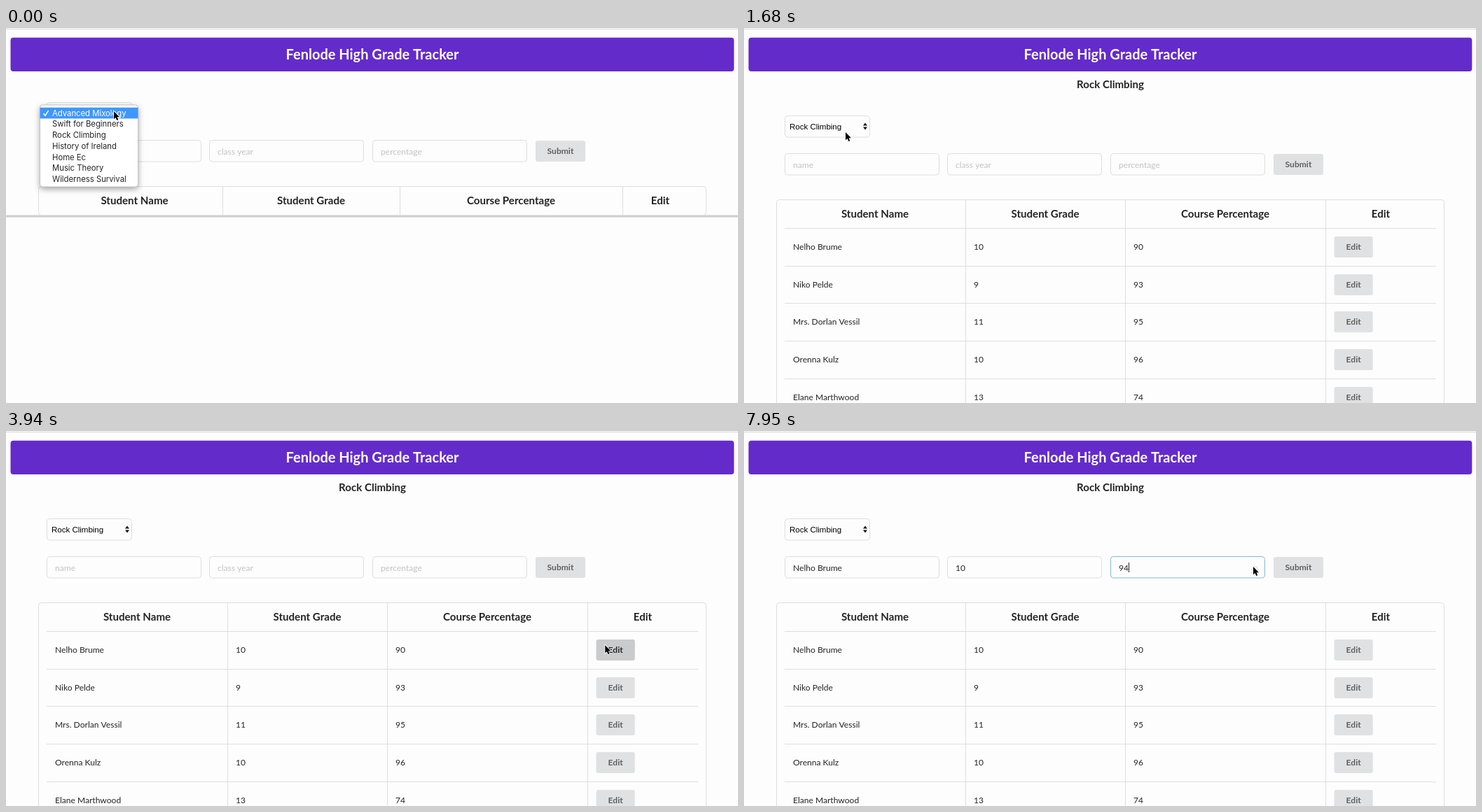
These frames come from a looping animation (1045x536 px, 8000 ms). An HTML page with a canvas:

```html
<!DOCTYPE html>
<html lang="en">
<head>
<meta charset="utf-8">
<title>Grade Tracker</title>
<style>
html, body { margin: 0; width: 100%; height: 100%; overflow: hidden; background: #fdfdfd; }
canvas { display: block; }
</style>
</head>
<body>
<canvas id="stage" width="1045" height="536"></canvas>
<script>
const ctx = document.getElementById('stage').getContext('2d');
const LOOP = 8000, STEP = 148;
const INK = '#242424', LINE = '#dedede', PAGE = '#fdfdfd';
const lato = (size, weight = 400) => `${weight} ${size}px Lato, sans-serif`;
const BODY = lato(12.07), BOLD = lato(12.07, 700), HEAD = lato(15.1, 700);
const SELECT_FONT = '11.5px "Liberation Sans", Arial, sans-serif';
const MENU_FONT = '11.3px Inter, sans-serif';

const courses = ['Advanced Mixology', 'Swift for Beginners', 'Rock Climbing',
  'History of Ireland', 'Home Ec', 'Music Theory', 'Wilderness Survival'];
const headings = ['Student Name', 'Student Grade', 'Course Percentage', 'Edit'];
const students = [['Nelho Brume', 10, 90], ['Niko Pelde', 9, 93],
  ['Mrs. Dorlan Vessil', 11, 95], ['Orenna Kulz', 10, 96], ['Elane Marthwood', 13, 74]];

// Each move eases out to (x, y) in a few visible steps
const moves = [
  { start: 150, steps: 5, x: 145, y: 149, power: 2 },
  { start: 2570, steps: 4, x: 550, y: 262, power: 2 },
  { start: 3350, steps: 5, x: 868, y: 308, power: 2 },
  { start: 4980, steps: 8, x: 727, y: 194, power: 4.2 }
];

function pointerAt(t) {
  let x = 154, y = 119;
  for (const move of moves) {
    if (t < move.start) break;
    const step = Math.floor((t - move.start) / STEP) + 1;
    const p = 1 - (1 - Math.min(1, step / move.steps)) ** move.power;
    x += (move.x - x) * p;
    y += (move.y - y) * p;
  }
  return [x, y];
}

function text(str, x, y, font, color = INK, align = 'left') {
  ctx.font = font;
  ctx.fillStyle = color;
  ctx.textAlign = align;
  ctx.fillText(str, x, y);
}

function box(x, y, w, h, r, fill, stroke) {
  ctx.beginPath();
  ctx.roundRect(x, y, w, h, r);
  ctx.fillStyle = fill;
  ctx.fill();
  if (stroke) {
    ctx.strokeStyle = stroke;
    ctx.lineWidth = 1;
    ctx.stroke();
  }
}

function rect(x, y, w, h, fill) {
  ctx.fillStyle = fill;
  ctx.fillRect(x, y, w, h);
}

function path(points) {
  ctx.beginPath();
  points.forEach(([x, y]) => ctx.lineTo(x, y));
}

// Up and down triangles around (x, y)
function arrows(x, y, half, height, gap, color) {
  ctx.fillStyle = color;
  for (const dir of [-1, 1]) {
    const base = y + dir * gap;
    path([[x - half, base], [x, base + dir * height], [x + half, base]]);
    ctx.fill();
  }
}

function button(label, x, y, w, active) {
  box(x, y, w, 30, 3, active ? '#cacbcd' : '#e0e1e2');
  text(label, x + w / 2, y + 19, BOLD, active ? '#282929' : '#5e5f5f', 'center');
}

function header(loaded) {
  rect(0, 0, 1045, 536, PAGE);
  rect(0, 1, 1045, 1, '#d6d6d6');
  box(6.5, 13.8, 1032.8, 48.3, 4, '#642bcb');
  text('Fenlode High Grade Tracker', 523, 45, lato(20, 700), '#fff', 'center');
  if (loaded) text('Rock Climbing', 523, 86, HEAD, INK, 'center');
}

function form(t, dy) {
  box(58.5, 106.5 + dy, 121, 30.5, 4, PAGE, LINE);
  text(courses[t < 1530 ? 0 : 2], 65, 126 + dy, SELECT_FONT, '#000');
  arrows(173, 121.5 + dy, 3, 4, 1, '#111');

  const filled = t >= 4390, focused = t >= 6610;
  const score = 90 + Math.max(0, Math.floor((t - 6610) / 295));
  const values = filled ? [students[0][0], 10, score] : ['name', 'class year', 'percentage'];
  values.forEach((value, i) => {
    const x = Math.floor(58 + i * 232.5) + 0.5;
    box(x, 160.5 + dy, 220, 30.5, 4, PAGE, focused && i === 2 ? '#85b7d9' : LINE);
    text(value, x + 11.5, 181 + dy, BODY, filled ? INK : '#c2c2c2');
  });
  if (t >= 5720) {
    box(725.5, 193.5, 8, 13, 3, '#f3f3f3', '#dedede');
    arrows(729.5, 200, 2, 2.5, 2, '#888');
  }
  if (focused) rect(549, 188, 1, 14, '#222');
  button('Submit', 756, 161 + dy, 71, false);
}

function table(t, loaded) {
  const top = loaded ? 245 : 226;
  const edges = loaded ? [58, 316, 544, 830, 988] : [58, 309, 562, 880, 988];
  const height = loaded ? 400 : 41;
  box(46.5, top + 0.5, 953, height, 4, PAGE, LINE);
  headings.forEach((label, i) => {
    if (i) rect(edges[i], top + 1, 1, height, LINE);
    text(label, (edges[i] + edges[i + 1]) / 2, top + 26, HEAD, INK, 'center');
  });

  if (!loaded) {
    rect(0, 267, 1045, 4, '#e2e2e2');
    rect(0, 268, 1045, 2, '#cfcfcf');
    return;
  }
  students.forEach((row, i) => {
    const y = Math.round(286 + i * 53.67);
    rect(58, y, 930, 1, LINE);
    row.forEach((cell, c) => text(cell, edges[c] + 12, y + 31, BODY));
    button('Edit', 842.5, y + 12, 55.3, i === 0 && t >= 3790 && t < 6610);
  });
}

function menu(t, pointerY) {
  const pitch = 15.7, top = 113.7;
  const selected = Math.floor((pointerY - top) / pitch);
  const blink = t >= 1230 && t < 1380;
  ctx.save();
  ctx.globalAlpha = t < 1380 ? 1 : 0.17;
  ctx.save();
  ctx.shadowColor = 'rgba(0,0,0,.38)';
  ctx.shadowBlur = 9;
  ctx.shadowOffsetY = 3;
  box(48.5, 110, 140, 117, 4, '#fff');
  ctx.restore();
  box(48.5, 110, 140, 117, 4, '#fff', '#c4c4c4');
  courses.forEach((course, i) => {
    const y = top + i * pitch;
    const lit = i === selected && !blink;
    const color = lit ? '#fff' : INK;
    if (lit) rect(48.5, y, 140, pitch, '#3f97fc');
    text(course, 66, y + 12, MENU_FONT, color);
    if (i === 0) {
      path([[53.5, y + 8.5], [56, y + 11.5], [60.5, y + 4.5]]);
      ctx.strokeStyle = color;
      ctx.lineWidth = 1.5;
      ctx.stroke();
    }
  });
  ctx.restore();
}

function cursor(x, y) {
  ctx.save();
  ctx.translate(x, y);
  path([[0, 0], [0, 11.2], [2.5, 9], [4.3, 13], [6.3, 12.2], [4.6, 8.3], [8, 8.2]]);
  ctx.closePath();
  ctx.strokeStyle = '#fff';
  ctx.lineWidth = 1.6;
  ctx.stroke();
  ctx.fillStyle = '#000';
  ctx.fill();
  ctx.restore();
}

function draw(t) {
  const loaded = t >= 1680;
  const [x, y] = pointerAt(t);
  header(loaded);
  form(t, loaded ? 19 : 0);
  table(t, loaded);
  if (t < 1530) menu(t, y);
  cursor(x, y);
}

const start = performance.now();
function tick() {
  draw((performance.now() - start) % LOOP);
  requestAnimationFrame(tick);
}
tick();
</script>
</body>
</html>
```
